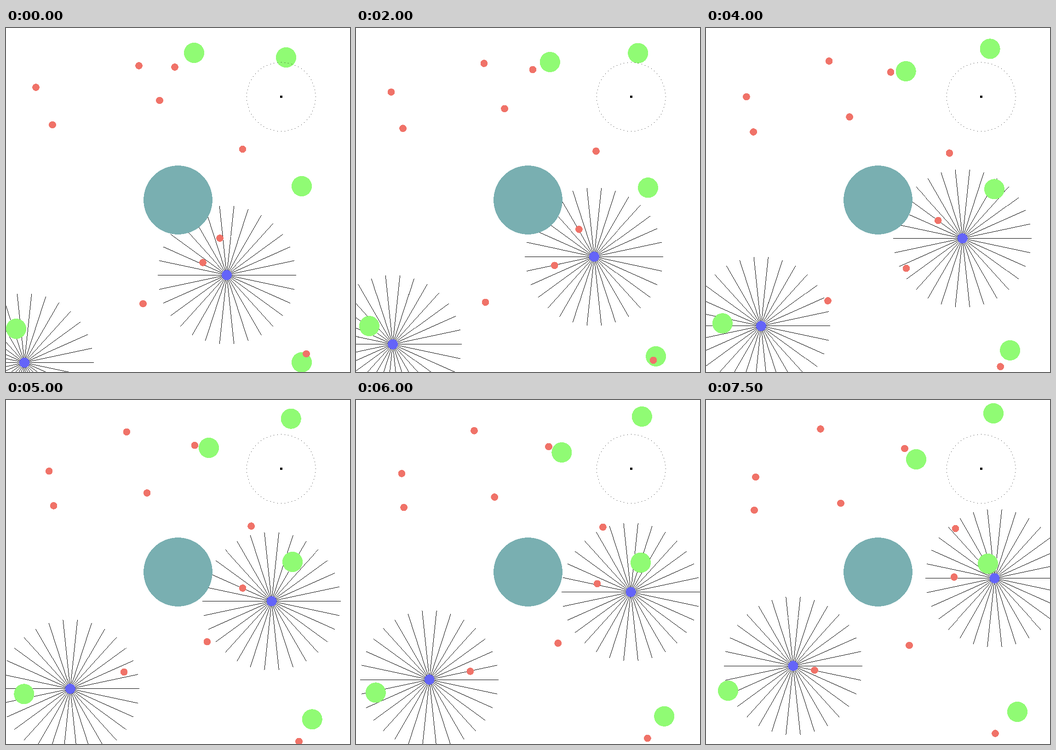
An HTML page with a canvas that plays this animation: 748 by 748 pixels, repeating every 8000 ms.

```html
<!DOCTYPE html>
<html lang="en">
<head>
<meta charset="utf-8">
<title>Drifting discs</title>
<style>
  html, body { margin: 0; width: 100%; height: 100%; overflow: hidden; background: #fff; }
  canvas { display: block; }
</style>
</head>
<body>
<canvas id="stage" width="748" height="748"></canvas>
<script>
const ctx = document.getElementById('stage').getContext('2d');
const SIZE = 748, LOOP = 8000, STEP = 500, SPAN = 7.5, FLOOR = 742.8;
const GREEN = { r: 22, color: '#90fb74' };
const RED = { r: 7.8, color: '#f07268' };

function dot(x, y) {
  ctx.fillRect(Math.floor(x), Math.floor(y), 1, 1);
}

// Shapes are filled in whole pixels to keep hard edges.
function disc(x, y, r, color) {
  ctx.fillStyle = color;
  for (let row = Math.round(y - r); row < Math.round(y + r); row++) {
    const half = Math.sqrt(Math.max(0, r * r - (row + 0.5 - y) ** 2));
    const left = Math.round(x - half);
    ctx.fillRect(left, row, Math.round(x + half) - left, 1);
  }
}

// Calls plot for count evenly spaced points on a circle.
function around(count, r, plot) {
  for (let i = 0; i < count; i++) {
    const a = 2 * Math.PI * i / count;
    plot(r * Math.cos(a), r * Math.sin(a));
  }
}

function line(x, y, dx, dy) {
  const n = Math.round(Math.max(Math.abs(dx), Math.abs(dy)));
  for (let i = 0; i <= n; i++) dot(x + dx * i / n, y + dy * i / n);
}

function burst(x, y) {
  ctx.fillStyle = '#000';
  around(30, 150, (dx, dy) => line(x, y, dx, dy));
  disc(x, y, 11, '#6464f9');
}

function beacon(x, y) {
  ctx.fillStyle = '#000';
  around(60, 75, (dx, dy) => dot(x + dx, y + dy));
  ctx.fillRect(Math.round(x - 2.5), Math.round(y - 2.5), 5, 5);
}

// Straight, even motion between two points, bouncing off the floor.
function glide(kind, t, x0, y0, x1, y1) {
  const p = t / SPAN;
  const x = x0 + (x1 - x0) * p;
  const y = y0 + (y1 - y0) * p;
  disc(x, FLOOR - Math.abs(FLOOR - y), kind.r, kind.color);
}

function draw(t) {
  ctx.fillStyle = '#fff';
  ctx.fillRect(0, 0, SIZE, SIZE);

  const move = 19.93 * t;
  burst(40 + move, 727.6 - move);
  burst(480 + move - Math.min(2, 4 * t), 537.1 - move);
  disc(SIZE / 2, SIZE / 2, SIZE / 10, '#79afb1');

  glide(GREEN, t, 409, 54, 457, 129);
  glide(GREEN, t, 609, 64, 625, 29);
  glide(GREEN, t, 643, 344, 613, 356);
  glide(GREEN, t, 22, 654, 48, 632);
  glide(GREEN, t, 643, 727, 677, 678);

  glide(RED, t, 65, 129, 108, 167.5);
  glide(RED, t, 101, 210.5, 105, 239.5);
  glide(RED, t, 289, 82, 249, 63);
  glide(RED, t, 367, 85, 432, 105.5);
  glide(RED, t, 334, 157.5, 293, 224.5);
  glide(RED, t, 514.5, 263.5, 542.5, 279.5);
  glide(RED, t, 465, 457, 539.5, 385);
  glide(RED, t, 428, 510, 442, 533.5);
  glide(RED, t, 298, 599.5, 236, 587.5);
  glide(RED, t, 653, 708.5, 629, 760.5);

  beacon(SIZE * 0.8, SIZE * 0.2);
}

const start = performance.now();
let shown = -1;
function tick() {
  const step = Math.floor(((performance.now() - start) % LOOP) / STEP);
  if (step !== shown) {
    shown = step;
    draw(step * STEP / 1000);
  }
  requestAnimationFrame(tick);
}
tick();
</script>
</body>
</html>
```
